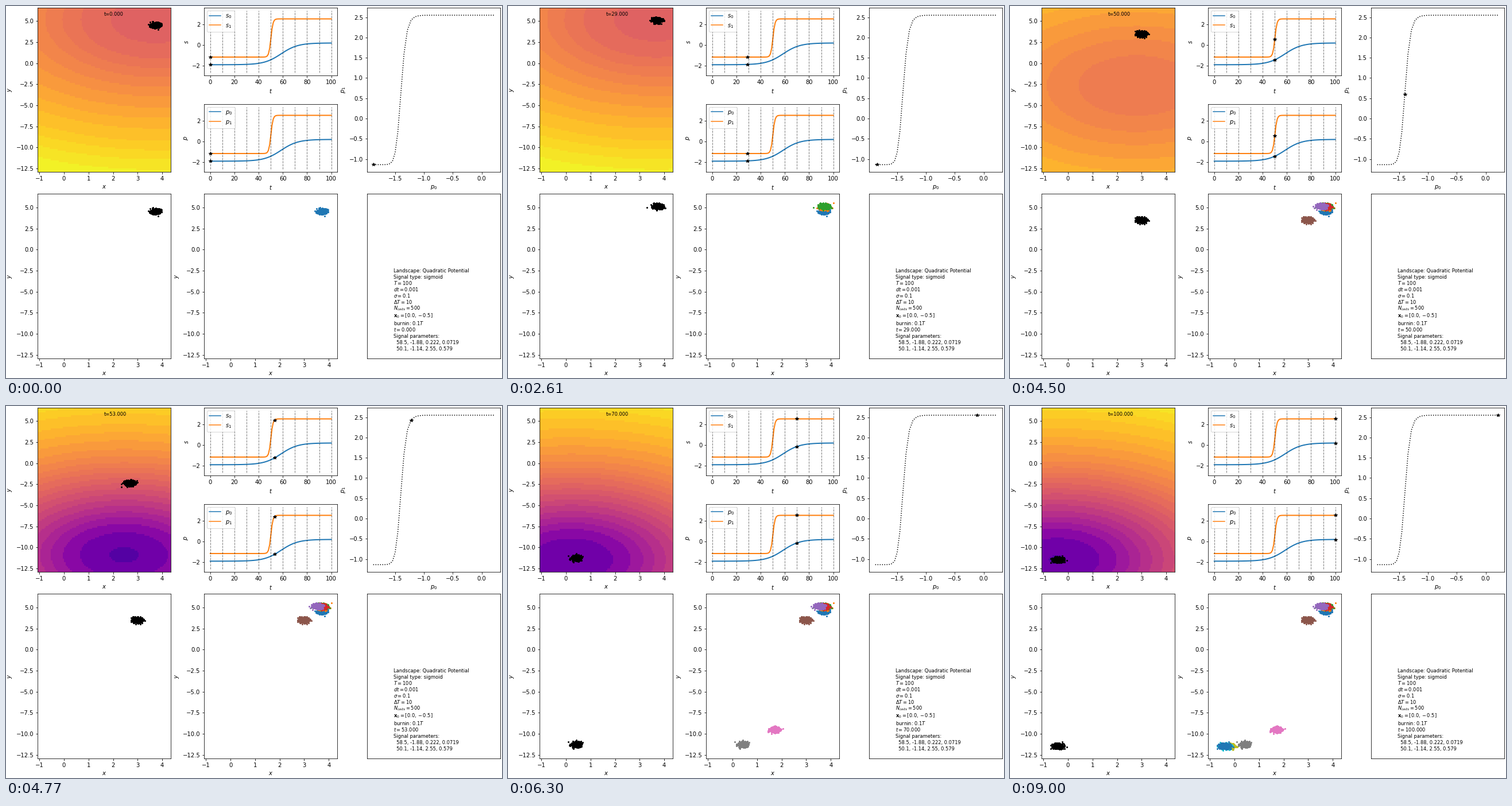
These frames come from a looping animation (864x648 px, 9090 ms). A matplotlib script:

```python
import numpy as np
import matplotlib.pyplot as plt
from matplotlib.animation import FuncAnimation
from matplotlib.colors import BoundaryNorm, ListedColormap

W, H = 864, 648
T_END, SAMPLE_STEP, BURNIN = 100, 10, 10
N_CELLS, SIGMA, SUBSTEPS = 500, 0.1, 40
XLIM, YLIM = (-1.07, 4.35), (-12.93, 6.6)
# panel edges in pixels from the top left
COLUMNS, PANEL_W = (55.2, 345.3, 629.1), 231.9
UPPER, LOWER = (3, 289.4), (327.4, 614)
HALF_H = 118.4
# switch time, start value, end value, rate
SIGNALS = [(58.5, -1.88, 0.222, 0.0719), (50.1, -1.14, 2.55, 0.579)]
STIFFNESS = np.array([1 / 2, 2 / 9])


def signal(t):
    return np.array([a + (b - a) * (1 + np.tanh(r * (t - tc))) / 2
                     for tc, a, b, r in SIGNALS])


def simulate():
    """Cell positions at every whole time, after the burn-in."""
    rng = np.random.default_rng(7)
    dt = 1 / SUBSTEPS
    cells = np.tile([0.0, -0.5], (N_CELLS, 1))
    history = []
    for t in range(-BURNIN, T_END + 1):
        if t >= 0:
            history.append(cells.copy())
        for k in range(SUBSTEPS):
            drift = -(cells * STIFFNESS + signal(max(t + k * dt, 0)))
            noise = rng.standard_normal(cells.shape)
            cells = cells + drift * dt + SIGMA * np.sqrt(dt) * noise
    return history


def pixel_centers(lim, n=100):
    step = (lim[1] - lim[0]) / n
    return lim[0] + step * (np.arange(n) + 0.5)


GX, GY = np.meshgrid(pixel_centers(XLIM), pixel_centers(YLIM))
BOWL = GX**2 / 4 + GY**2 / 9
times = np.arange(T_END + 1)
params = signal(times)
cells = simulate()
LOWEST = -np.max(params[0]**2 + 9 / 4 * params[1]**2)
LOG_MAX = np.log1p(51.2)


def landscape(i):
    phi = BOWL + params[0, i] * GX + params[1, i] * GY
    return np.log1p(np.maximum(phi - LOWEST, 0)) / LOG_MAX


plt.rcParams.update({"font.family": "DejaVu Sans", "font.size": 10})
fig = plt.figure(figsize=(W / 72, H / 72), dpi=72)


def panel(column, rows, xlabel="", ylabel=""):
    top, bottom = rows
    ax = fig.add_axes([COLUMNS[column] / W, 1 - bottom / H,
                       PANEL_W / W, (bottom - top) / H])
    ax.set_xlabel(xlabel)
    ax.set_ylabel(ylabel)
    return ax


def plane(column, rows):
    ax = panel(column, rows, "$x$", "$y$")
    ax.set(xlim=XLIM, ylim=YLIM)
    return ax


def dots(ax, color="k"):
    return ax.plot([], [], "o", ms=2, color=color)[0]


def signal_panel(rows, name):
    ax = panel(1, rows, "$t$", f"${name}$")
    for k in range(2):
        ax.plot(times, params[k], lw=2, label=f"${name}_{k}$")
    ax.vlines(np.arange(0, T_END + 1, SAMPLE_STEP), -2.64, 3.33,
              colors="k", linestyles="--", linewidth=1, alpha=0.5)
    ax.set(xlim=(-5, 105), ylim=(-2.94, 3.63))
    for handle in ax.legend(loc="upper left").get_lines():
        handle.set_linewidth(1.5)
    return ax.plot([], [], "k*", zorder=4)[0]


# landscape, drawn in flat colour bands
edges = np.array([0, .06, .115, .178, .254, .314, .36, .40, .44, .48, .515,
                  .55, .58, .608, .64, .665, .69, .72, .75, .785, .818, .849,
                  .885, .911, .937, .965, 1])
bands = ListedColormap(plt.get_cmap("plasma")((edges[1:] + edges[:-1]) / 2))
ax_land = plane(0, UPPER)
image = ax_land.imshow(landscape(0), extent=(*XLIM, *YLIM), origin="lower",
                       aspect="auto", interpolation="nearest", cmap=bands,
                       norm=BoundaryNorm(edges, bands.N))
live_dots = dots(ax_land)
clock = ax_land.text(0.5, 0.95, "", fontsize="small",
                     transform=ax_land.transAxes)

signal_stars = [signal_panel((UPPER[0], UPPER[0] + HALF_H), "s"),
                signal_panel((UPPER[1] - HALF_H, UPPER[1]), "p")]

ax_path = panel(2, UPPER, "$p_0$", "$p_1$")
ax_path.plot(*params, "k:")
path_star = ax_path.plot([], [], "k*")[0]

sample_dots = dots(plane(0, LOWER))
ax_all = plane(1, LOWER)
trail = [dots(ax_all, f"C{k % 10}") for k in range(T_END // SAMPLE_STEP + 1)]


def info_panel():
    """Write the settings upwards from the last line; return the time line."""
    ax = panel(2, LOWER)
    ax.set(xticks=[], yticks=[])
    lines = ["Landscape: Quadratic Potential", "Signal type: sigmoid",
             "$T=100$", "$dt=0.001$", r"$\sigma=0.1$", r"$\Delta T=10$",
             "$N_{cells}=500$", r"$\mathbf{x}_0=[0.0, -0.5]$",
             "burnin: $0.1T$", "$t=0.000$", "Signal parameters:"]
    lines += ["  " + ", ".join(f"{v:.3g}" for v in s) for s in SIGNALS]
    height = LOWER[1] - LOWER[0]
    y, below = 0.05 * height, ""
    for line in reversed(lines):
        if below:
            y += 13 if "mathbf" in line + below else 11
        text = ax.text(0.2, y / height, line, fontsize="small",
                       transform=ax.transAxes)
        if line.startswith("$t="):
            time_line = text
        below = line
    return time_line


time_line = info_panel()


def update(i):
    image.set_data(landscape(i))
    live_dots.set_data(*cells[i].T)
    clock.set_text(f"t={i:.3f}")
    for star in signal_stars:
        star.set_data([i, i], params[:, i])
    path_star.set_data(params[:1, i], params[1:, i])
    last = i // SAMPLE_STEP
    sample_dots.set_data(*cells[last * SAMPLE_STEP].T)
    for k, group in enumerate(trail):
        group.set_data(*(cells[k * SAMPLE_STEP].T if k <= last else ([], [])))
    time_line.set_text(f"$t={i:.3f}$")
    return []


anim = FuncAnimation(fig, update, frames=T_END + 1, interval=90,
                     init_func=lambda: update(0), repeat=True, repeat_delay=0)
plt.show()
```
